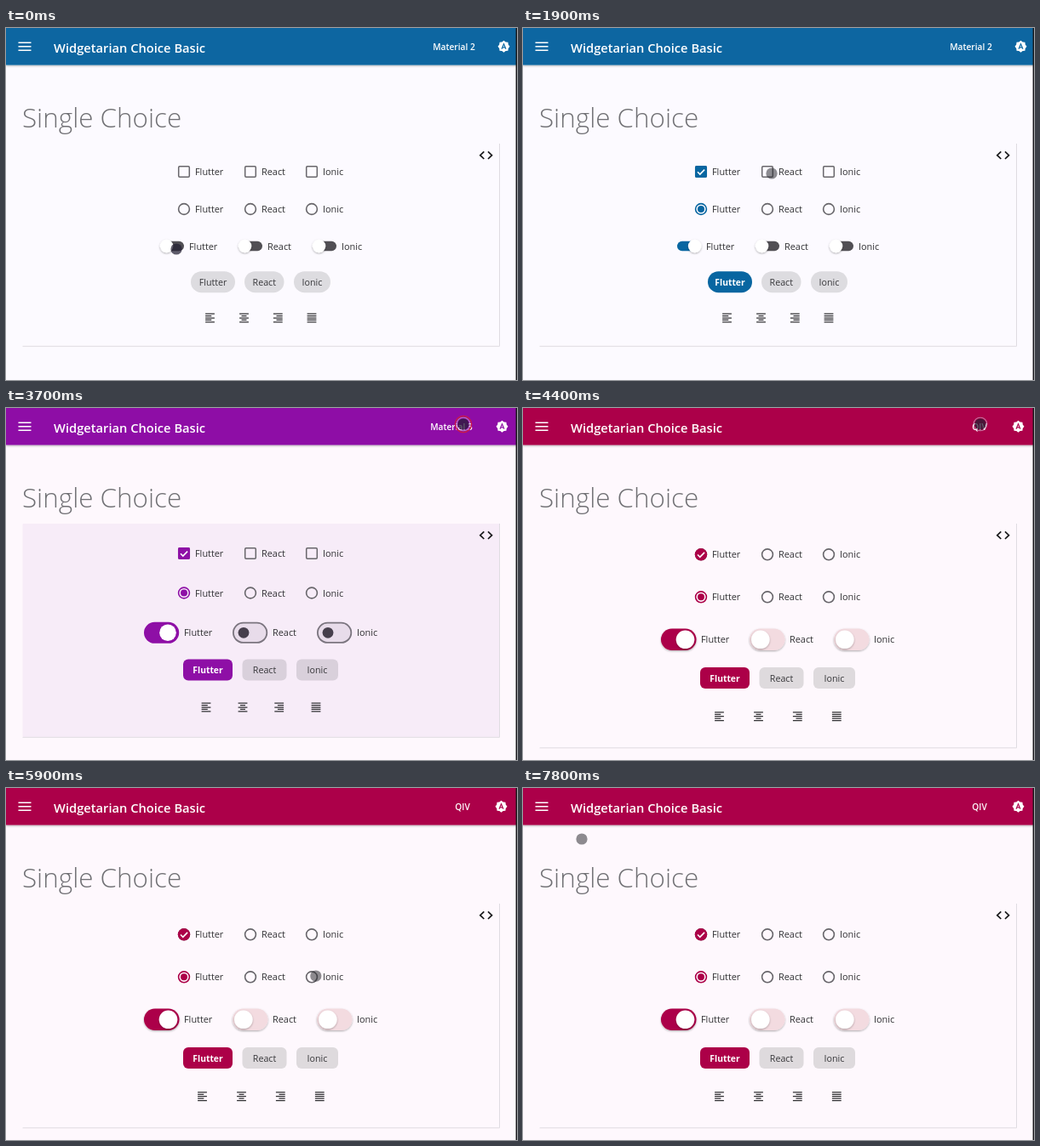
Animation, 600 px wide and 414 px high, one loop 8000 ms. Source, as an HTML page:

```html
<!DOCTYPE html>
<html lang="en">
<head>
<meta charset="utf-8">
<title>Choice widgets</title>
<style>
  html, body { margin: 0; width: 100%; height: 100%; overflow: hidden; }
  svg { display: block; width: 600px; height: 414px; }
  text { font-family: "Open Sans", "Noto Sans", sans-serif; }
  .label { font-size: 10.9px; font-weight: 500; fill: #303033; }
  .chip { font-size: 10.7px; font-weight: 500; fill: #38383b; text-anchor: middle; }
  .chip.on { font-size: 10.3px; font-weight: 700; fill: #fff; }
  .title { font-size: 14.7px; font-weight: 600; fill: #fff; }
  .mode { font-size: 10.2px; font-weight: 600; fill: #fff; text-anchor: middle; }
  .head { font-size: 31.4px; font-weight: 300; fill: #707074; }
</style>
</head>
<body>
<svg id="stage" viewBox="0 0 600 414"></svg>
<script>
const LOOP = 8000, STEP = 100;
const NAMES = ['Flutter', 'React', 'Ionic'];
const BLUE = '#0866a1', PURPLE = '#8e0fa6', CRIMSON = '#ac0048';
const OUTLINE = '#68666b';
const CHOICE_X = [209, 287, 359];

// Row positions and sizes of the three design systems
const LAYOUTS = {
  m2: {
    mode: 'Material 2', modeX: 526, themeX: 584.5, bottom: 374,
    rows: [169, 213, 256.5, 298.7, 341],
    switchX: [181, 273, 360], switchText: 34,
    chips: [[217, 52], [280, 46.5], [338, 43]], chipR: 12.5,
    icons: [239.5, 279.5, 319.3, 359]
  },
  m3: {
    mode: 'Material 3', modeX: 523, themeX: 582.5, bottom: 387,
    rows: [171, 217.5, 264.3, 308, 352],
    switchX: [162, 266, 365], switchText: 47,
    chips: [[208, 58], [277.5, 52], [341, 49]], chipR: 6,
    icons: [235, 278, 320.7, 364]
  },
  round: {
    mode: 'QIV', modeX: 536, themeX: 581.5, bottom: 399.5,
    rows: [172.3, 222.3, 272.3, 317.5, 362.7],
    switchX: [162, 266, 365], switchText: 47,
    chips: [[208, 58], [277.5, 52], [341, 49]], chipR: 6,
    icons: [230.5, 276.5, 322.3, 368.3]
  }
};

const COLORS = {
  bar: [[2800, BLUE], [3200, '#7a1ca5'], [3400, PURPLE], [4000, PURPLE], [4200, CRIMSON]],
  main: [[3300, BLUE], [3500, PURPLE], [4100, PURPLE], [4300, CRIMSON]],
  page: [[2900, '#fcfaff'], [3200, '#fdf8fe'], [3500, '#fef8fd']],
  card: [[2800, '#fcfaff'], [3100, '#eff3f8'], [3300, '#eff3f8'], [3500, '#f7ecf8'], [4000, '#f7ecf8'], [4200, '#fef8fd']],
  chip: [[2800, '#dddce0'], [3200, '#d6d6da'], [3300, '#d6d6da'], [3500, '#d9d0db'], [4000, '#d9d0db'], [4200, '#dedadd']],
  track: [[3300, '#dfdfea'], [3500, '#e8dcea'], [4000, '#e8dcea'], [4200, '#f3dbe0']]
};

const POINTER = [
  [0, [200, 260]], [1100, [200, 260]], [1900, [292, 171]], [2600, [537, 19]],
  [4900, [537, 19]], [6300, [321, 271]], [6500, [321, 271]], [6800, [226, 279]],
  [7000, [194, 273]], [7300, [194, 273]], [7800, [69, 60]]
];
const CLICKS = [1000, 2700, 3600, 6500, 7100];
const PICKS = [[1100, 0], [6500, 1], [7150, 0]];

const clamp = v => Math.max(0, Math.min(1, v));
const ramp = (t, a, b) => clamp((t - a) / (b - a));
const smooth = k => k * k * (3 - 2 * k);
const mix = (a, b, k) => a + (b - a) * k;
const rgb = hex => [1, 3, 5].map(i => parseInt(hex.slice(i, i + 2), 16));
const blend = (a, b, k) => {
  const to = rgb(b);
  return '#' + rgb(a).map((v, i) =>
    Math.round(mix(v, to[i], k)).toString(16).padStart(2, '0')).join('');
};

function follow(keys, t, join, ease = k => k) {
  const next = keys.findIndex(key => key[0] > t);
  if (next === 0) return keys[0][1];
  if (next < 0) return keys[keys.length - 1][1];
  const [a, b] = [keys[next - 1], keys[next]];
  return join(a[1], b[1], ease(ramp(t, a[0], b[0])));
}
const pointerAt = t =>
  follow(POINTER, t, (a, b, k) => a.map((v, i) => mix(v, b[i], k)), smooth);

function selected(i, t) {
  let value = 0;
  for (const [time, pick] of PICKS) {
    if (t >= time) value = mix(value, pick === i ? 1 : 0, ramp(t, time, time + 200));
  }
  return value;
}

const rect = (x, y, w, h, r, fill, more = '') =>
  `<rect x="${x}" y="${y}" width="${w}" height="${h}" rx="${r}" fill="${fill}" ${more}/>`;
const circle = (x, y, r, fill, more = '') =>
  `<circle cx="${x}" cy="${y}" r="${r}" fill="${fill}" ${more}/>`;
const line = (d, color, width, more = '') =>
  `<path d="${d}" fill="none" stroke="${color}" stroke-width="${width}" ${more}/>`;
const text = (x, y, cls, s) => `<text x="${x}" y="${y}" class="${cls}">${s}</text>`;
const edge = (color, width) => `stroke="${color}" stroke-width="${width}"`;

function checkbox(x, y, on, kind, main) {
  const round = kind === 'round';
  const box = round
    ? circle(x, y, 6.4, 'none', edge(OUTLINE, 1.6))
    : rect(x - 6.3, y - 6.3, 12.6, 12.6, 1.2, 'none', edge(OUTLINE, 1.5));
  const fill = round ? circle(x, y, 7.2, main) : rect(x - 7, y - 7, 14, 14, 1.8, main);
  const tick = line(`M${x - 4} ${y + 0.2}l2.8 2.8l5.3-5.4`, '#fff', 1.6);
  return box + `<g opacity="${on}">${fill}${tick}</g>`;
}

function radio(x, y, on, main) {
  return circle(x, y, 6.4, 'none', edge(blend(OUTLINE, main, on), 1.6)) +
    circle(x, y, 4 * on, main);
}

function toggle(x, y, on, kind, c, t) {
  const shadow = 'filter="url(#soft)"';
  if (kind === 'm2') {
    return rect(x, y - 5.7, 28, 11.4, 5.7, blend('#514f54', c.main, on)) +
      circle(x + mix(7.5, 20.7, on), y, 7.8, '#fff', shadow);
  }
  if (kind === 'round') {
    return rect(x, y - 12.8, 41.5, 25.6, 12.8, blend(c.track, c.main, on), shadow) +
      circle(x + mix(12.8, 28.5, on), y, 10.8, '#fff', shadow);
  }
  const k = on * ramp(t, 3300, 3500);
  const body = blend(c.track, c.main, k), rim = blend('#7b757f', c.main, k);
  return rect(x + 0.9, y - 11.6, 39.4, 23.2, 11.6, body, edge(rim, 1.8)) +
    circle(x + mix(13, 28, on), y, mix(6.4, 9.8, k), blend('#463f4c', '#ffffff', k));
}

function chip([x, w], y, r, on, name, c) {
  return rect(x, y - 12.5, w, 25, r, blend(c.chip, c.main, on)) +
    text(x + w / 2, y + 4.2, on > 0.5 ? 'chip on' : 'chip', name);
}

function alignIcon(x, y, i) {
  const short = [7.2, 6, 7.2, 10.8][i], shift = [0, 2.4, 3.6, 0][i];
  let d = '';
  for (let n = 0; n < 5; n++) {
    const odd = n % 2;
    d += `M${x - 5.4 + odd * shift} ${y + (n - 2) * 2.4}h${odd ? short : 10.8}`;
  }
  return line(d, '#303033', 1.25);
}

function themeIcon(x, y, bar) {
  let d = '';
  for (let i = 0; i < 16; i++) {
    const a = i * Math.PI / 8, r = i % 2 ? 5.7 : 7;
    d += `${i ? 'L' : 'M'}${x + r * Math.cos(a)} ${y + r * Math.sin(a)}`;
  }
  return `<path d="${d}Z" fill="#fff"/>` +
    line(`M${x - 2.5} ${y + 3}L${x} ${y - 3}L${x + 2.5} ${y + 3}M${x - 1.6} ${y + 1.2}h3.2`, bar, 1.1);
}

function header(L, c, t) {
  const ink = t >= 3000 && t < 3400 ? '#1c1020' : '#fff';
  return rect(0, 0, 600, 43.5, 0, c.bar, 'filter="url(#soft)"') +
    line('M14.5 17.2h15M14.5 21.7h15M14.5 26.2h15', ink, 1.6) +
    text(56, 28.6, 'title', 'Widgetarian Choice Basic') +
    text(L.modeX, 25.5, 'mode', L.mode) +
    themeIcon(L.themeX, 21.7, c.bar);
}

function pointer(t) {
  const [x, y] = pointerAt(t);
  const onBar = y < 40;
  const pressed = onBar || t < 200;
  let out = circle(x, y, 6.6, pressed ? 'rgba(35,30,50,.72)' : 'rgba(40,40,46,.53)');
  if (onBar) out += circle(x, y, 7.8, 'none', edge('rgba(215,195,220,.6)', 1.1));
  for (const time of CLICKS) {
    const age = t - time;
    if (age < 0 || age > 400) continue;
    const [cx, cy] = pointerAt(time);
    out += circle(cx, cy, 7.5 + age * 0.0215, 'none', edge('#cc1c45', 1.3));
  }
  return out;
}

const DEFS = `<defs><filter id="soft" x="-30%" y="-30%" width="160%" height="170%">
  <feDropShadow dx="0" dy="1" stdDeviation="1.1" flood-color="#000" flood-opacity=".32"/>
</filter></defs>`;

function draw(t) {
  const kind = t < 3000 ? 'm2' : t < 4100 ? 'm3' : 'round';
  const L = LAYOUTS[kind], [y1, y2, y3, y4, y5] = L.rows;
  const c = {};
  for (const name in COLORS) c[name] = follow(COLORS[name], t, blend);

  let out = DEFS + rect(0, 0, 600, 414, 0, c.page) + header(L, c, t) +
    text(19, 116.5, 'head', 'Single Choice') +
    rect(19.5, 136, 560, L.bottom - 136, 1, c.card) +
    line(`M579.5 136V${L.bottom + 0.3}H19.5`, '#dfdce2', 1) +
    line('M561.3 145.4l-4.5 4.3l4.5 4.3M566 145.4l4.5 4.3l-4.5 4.3', '#18181a', 1.7);

  NAMES.forEach((name, i) => {
    const on = selected(i, t), x = CHOICE_X[i], sx = L.switchX[i];
    out += checkbox(x, y1, on, kind, c.main) + text(x + 13, y1 + 4, 'label', name) +
      radio(x, y2, on, c.main) + text(x + 13, y2 + 4, 'label', name) +
      toggle(sx, y3, on, kind, c, t) + text(sx + L.switchText, y3 + 4, 'label', name) +
      chip(L.chips[i], y4, L.chipR, on, name, c);
  });
  L.icons.forEach((x, i) => { out += alignIcon(x, y5, i); });
  return out + pointer(t) + rect(598.6, 0, 1.4, 414, 0, '#17171a');
}

const stage = document.getElementById('stage');
const start = performance.now();
let shown = -1;

// The picture advances ten times a second
function tick() {
  const t = Math.floor(((performance.now() - start) % LOOP) / STEP) * STEP;
  if (t !== shown) {
    stage.innerHTML = draw(t);
    shown = t;
  }
  requestAnimationFrame(tick);
}
tick();
</script>
</body>
</html>
```
